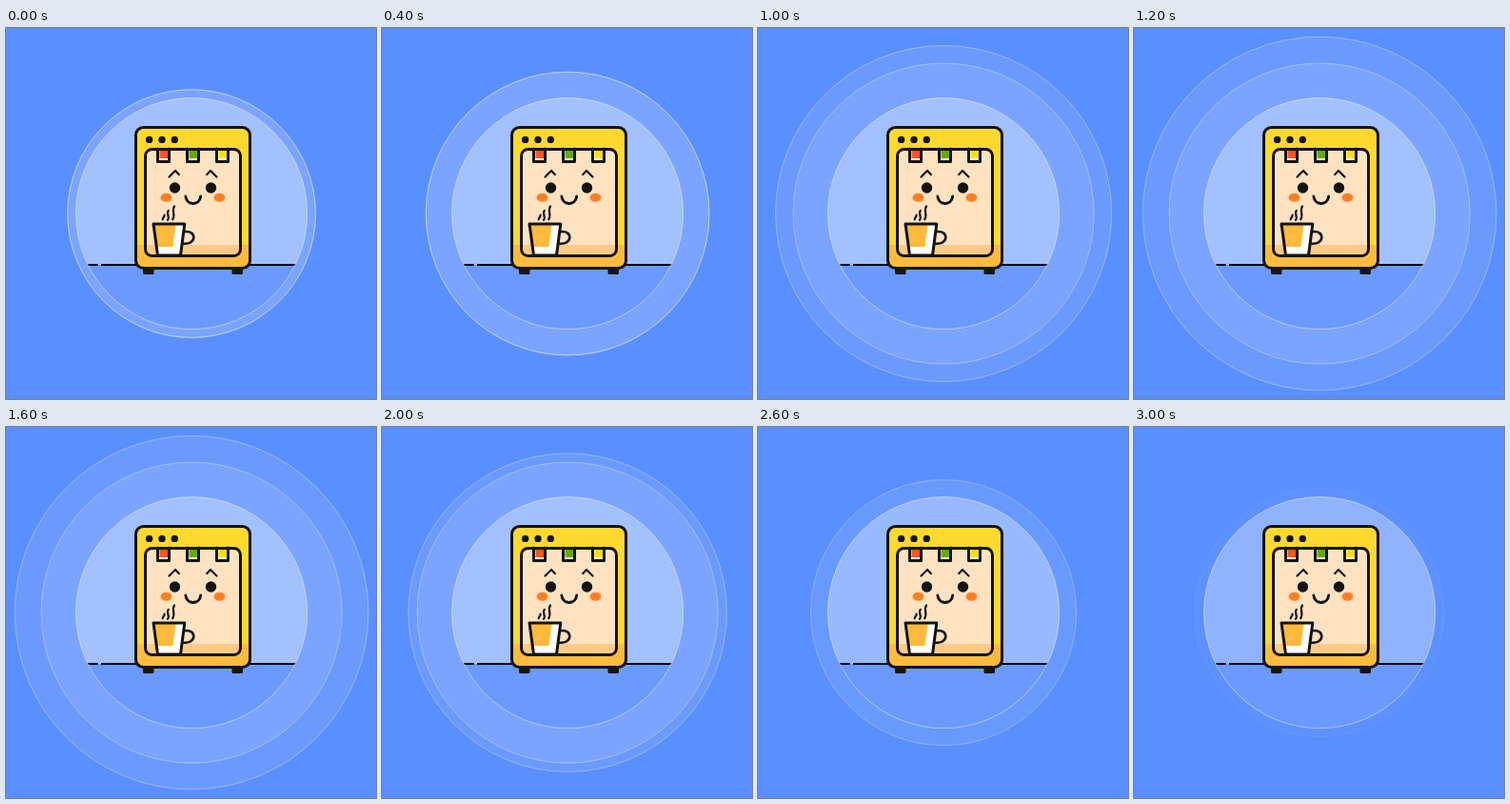
These frames come from a looping animation (389x390 px, 3200 ms). An HTML page:

```html
<!DOCTYPE html>
<html lang="en">
<head>
<meta charset="utf-8">
<title>Coffee machine</title>
<style>
  html, body { margin: 0; width: 100%; height: 100%; overflow: hidden; background: #5a8fff; }
  svg { display: block; width: 389px; height: 390px; }
  .disc { fill: #fff; fill-opacity: .1; stroke: #fff; stroke-opacity: .33; }
  .ink { fill: #141414; }
  .line { fill: none; stroke: #141414; stroke-linecap: round; stroke-linejoin: round; }
</style>
</head>
<body>
<svg viewBox="0 0 389 390">
  <defs>
    <clipPath id="scene"><circle cx="195.1" cy="195.1" r="121.6"/></clipPath>
    <clipPath id="body"><rect x="136.5" y="104.5" width="120" height="148" rx="8"/></clipPath>
    <clipPath id="window"><rect x="146.5" y="127.5" width="100" height="112" rx="7"/></clipPath>
    <g id="tab">
      <rect x="1.5" y="0.5" width="12" height="13" fill="#fff"/>
      <rect x="3.5" y="2" width="8.5" height="8"/>
      <path class="line" stroke-width="3" d="M1.5 0V13.5H13.5V0"/>
    </g>
  </defs>

  <circle id="outer" class="disc" cx="195.1" cy="195.1"/>
  <circle id="middle" class="disc" cx="195.1" cy="195.1"/>

  <!-- backdrop and floor -->
  <g clip-path="url(#scene)">
    <rect x="70" y="70" width="250" height="179" fill="#fff" fill-opacity=".31"/>
    <rect x="70" y="249" width="250" height="75" fill="#6a9aff"/>
    <path d="M80 249H96.5M100 249H310" stroke="#000" stroke-width="2"/>
  </g>
  <circle cx="195.1" cy="195.1" r="121.6" fill="none" stroke="#fff" stroke-opacity=".45"/>

  <!-- machine -->
  <path class="ink" d="M144 252H155.5V257.5Q155.5 259 154 259H145.5Q144 259 144 257.5ZM237.5 252H249V257.5Q249 259 247.5 259H239Q237.5 259 237.5 257.5Z"/>
  <g clip-path="url(#body)">
    <rect x="135" y="103" width="123" height="151" fill="#ffd92e"/>
    <rect x="135" y="228" width="123" height="26" fill="#ffbc3c"/>
  </g>
  <rect class="line" x="136.5" y="104.5" width="120" height="148" rx="8" stroke-width="3"/>
  <g class="ink">
    <circle cx="150.6" cy="117.4" r="3.7"/>
    <circle cx="164" cy="117.4" r="3.7"/>
    <circle cx="177.3" cy="117.4" r="3.7"/>
  </g>
  <g clip-path="url(#window)">
    <rect x="145" y="126" width="103" height="115" fill="#ffe2bf"/>
    <rect x="145" y="228" width="103" height="13" fill="#ffcb86"/>
  </g>
  <use href="#tab" x="158" y="127" fill="#ff5420"/>
  <use href="#tab" x="189" y="127" fill="#68a800"/>
  <use href="#tab" x="220" y="127" fill="#ffe000"/>
  <rect class="line" x="146.5" y="127.5" width="100" height="112" rx="7" stroke-width="3"/>

  <!-- face -->
  <path class="line" stroke-width="2.2" d="M171.5 156.5L178 150L181.8 154M211.2 154L215 150L221.5 156.5"/>
  <circle class="ink" cx="177.5" cy="168" r="5.7"/>
  <circle class="ink" cx="215.5" cy="168" r="5.7"/>
  <g fill="#ff7f22">
    <ellipse cx="168.5" cy="178.3" rx="5.9" ry="4.5"/>
    <ellipse cx="224.5" cy="178.3" rx="5.9" ry="4.5"/>
  </g>
  <path class="line" stroke-width="2.8" d="M188.8 177C190 187 203.5 187 204.7 177"/>

  <!-- cup -->
  <path class="line" stroke-width="2.6" d="M187 214.3C201 211.5 201 229 185.5 226.5"/>
  <path fill="#fff" d="M155 206H188L183.5 239H159.5Z"/>
  <path fill="#ffb93b" d="M156 207H178.5L175.5 230H159.5Z"/>
  <path class="line" stroke-width="3" d="M155 206H187.8L183.5 239H159.5Z"/>
  <path class="line" stroke-width="2.2" d="M164.7 201.3C164.7 198.8 166.8 199.2 166.6 196.5M170 201.8C172.8 198.5 168 195.3 170.7 191.8M175.3 201C178.5 196.5 173.8 192 177 187.3"/>
</svg>
<script>
  const LOOP = 3200, STEP = 200, PEAK = 7;
  const outer = document.getElementById('outer');
  const middle = document.getElementById('middle');

  function draw(time) {
    const step = Math.floor(time % LOOP / STEP);
    // Grow to the peak, shrink back, and fade on the way in.
    const reach = Math.max(0, PEAK - Math.abs(step - PEAK));
    const radius = Math.min(193.7, 130.4 + 9.25 * reach);
    const alpha = step > 10 ? 1 - 0.18 * (step - 10) : 1;
    outer.setAttribute('r', radius);
    middle.setAttribute('r', Math.min(radius, 158.1));
    outer.style.opacity = middle.style.opacity = alpha;
  }

  const start = performance.now();
  function tick() {
    draw(performance.now() - start);
    requestAnimationFrame(tick);
  }
  tick();
</script>
</body>
</html>
```
